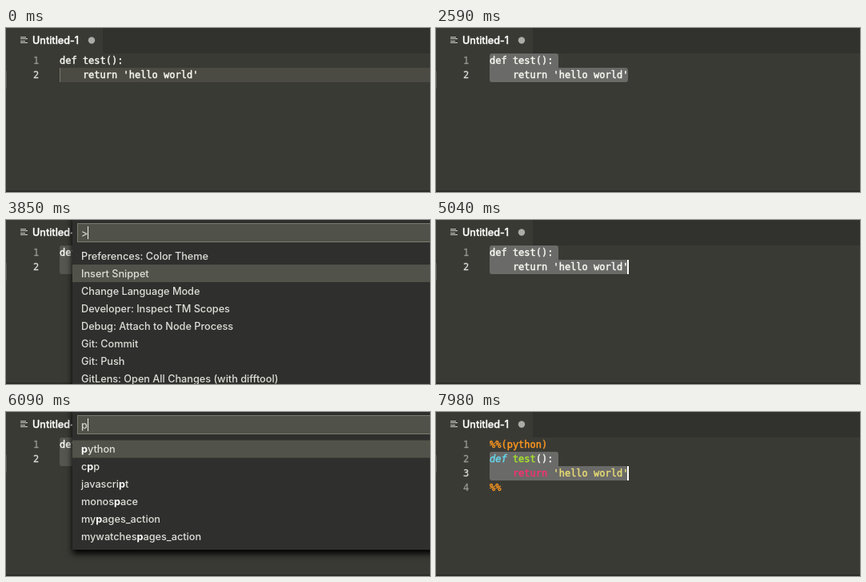
Write an HTML page with a canvas that moves like this. It is 530 px wide and 206 px high and loops after 8000 ms.

```html
<!DOCTYPE html>
<html lang="en">
<head>
<meta charset="utf-8">
<title>Insert snippet</title>
<style>
  html, body { margin: 0; width: 100%; height: 100%; overflow: hidden; background: #3a3a35; }
  canvas { display: block; width: 530px; height: 206px; }
</style>
</head>
<body>
<canvas id="stage"></canvas>
<script>
const W = 530, H = 206, LOOP = 8000;
const canvas = document.getElementById('stage');
const ctx = canvas.getContext('2d');
const dpr = window.devicePixelRatio || 1;
canvas.width = W * dpr;
canvas.height = H * dpr;

const UI = 'Inter, "Open Sans", sans-serif';
const LABEL = '500 12.7px ' + UI;
const MONO = '12px "DejaVu Sans Mono", monospace';
const CODE_X = 67, LINE_H = 18, CODE_TOP = 32, ROW_H = 22;
const C = {
  editor: '#3a3a35', tabs: '#31312e', edge: '#2b2b28',
  text: '#f8f8f2', line: '#4c4b43', sel: '#6a6a68', selDim: '#555650',
  panel: '#2f302d', focus: '#51534a', input: '#505249', border: '#7d7c70', label: '#deded9',
  orange: '#fd971f', cyan: '#66d9ef', green: '#a6e22e', pink: '#f5326f', yellow: '#e6db74'
};

const plainCode = [
  [['def test():', C.text]],
  [["    return 'hello world'", C.text]]
];
const snippetCode = [
  [['%%(python)', C.orange]],
  [['def', C.cyan, 'italic '], [' test', C.green], ['():', C.text]],
  [['    return', C.pink], [" 'hello world'", C.yellow]],
  [['%%', C.orange]]
];
const commands = ['Preferences: Color Theme', 'Insert Snippet', 'Change Language Mode',
  'Developer: Inspect TM Scopes', 'Debug: Attach to Node Process', 'Git: Commit', 'Git: Push',
  'GitLens: Open All Changes (with difftool)'];
const snippets = ['python', 'cpp', 'javascript', 'bold', 'italic', 'underline', 'monospace', 'table'];
const matches = ['python', 'cpp', 'javascript', 'monospace', 'mypages_action', 'mywatchespages_action'];
const typing = [[6020, 'p'], [6160, 'py'], [6370, 'pyt'], [6510, 'pyth'], [6720, 'pytho'], [6930, 'python']];

const within = (t, a, b) => t >= a && t < b;

function rect(x, y, w, h, color) {
  ctx.fillStyle = color;
  ctx.fillRect(x, y, w, h);
}

// Draws text and returns the x where it ends.
function text(str, x, y, font, color, weight = 0) {
  ctx.font = font;
  ctx.fillStyle = color;
  ctx.fillText(str, x, y);
  if (weight) {
    ctx.strokeStyle = color;
    ctx.lineWidth = weight;
    ctx.strokeText(str, x, y);
  }
  return x + ctx.measureText(str).width;
}

function drawFrame() {
  rect(0, 0, W, H, C.editor);
  rect(121, 0, W - 121, CODE_TOP, C.tabs);
  rect(0, 54, 1, 22, '#565651');
  rect(0, H - 2, W, 2, C.edge);
  [[11, 7], [13, 9], [16, 6], [18, 9]].forEach(([y, w]) => rect(18, y, w, 1, '#d0d0cc'));
  text('Untitled-1', 33, 20, '500 12.6px ' + UI, '#ffffff', 0.35);
  ctx.fillStyle = '#ababa7';
  ctx.beginPath();
  ctx.arc(107, 15.5, 4.2, 0, Math.PI * 2);
  ctx.fill();
}

function drawSelection(first, color) {
  const y = CODE_TOP + first * LINE_H;
  ctx.fillStyle = color;
  ctx.beginPath();
  ctx.roundRect(CODE_X, y, 86, LINE_H, [3, 3, 0, 0]);
  ctx.roundRect(CODE_X, y + LINE_H, 173, LINE_H, [0, 3, 3, 3]);
  ctx.fill();
}

function drawCode(lines, active) {
  lines.forEach((parts, i) => {
    const y = CODE_TOP + i * LINE_H + 13;
    text(String(i + 1), 34, y, MONO, i === active ? '#d8d8d4' : '#979791', 0.3);
    let x = CODE_X;
    for (const [str, color, style = ''] of parts) x = text(str, x, y, style + MONO, color, 0.45);
  });
}

function drawRow(label, query, x, y) {
  const start = query ? label.indexOf(query) : 0;
  const end = start + query.length;
  x = text(label.slice(0, start), x, y, LABEL, C.label);
  x = text(query, x, y, 'bold 12.7px ' + UI, '#ffffff');
  text(label.slice(end), x, y, LABEL, C.label);
}

function drawPalette({ value, query = '', items, focus = 0, top, caret }) {
  const bottom = top + items.length * ROW_H + 5.5;
  ctx.save();
  ctx.shadowColor = '#000';
  ctx.shadowBlur = 8 * dpr;
  ctx.shadowOffsetY = 4.5 * dpr;
  rect(83, -10, W, bottom + 10, C.panel);
  ctx.restore();

  rect(89, 4, W, 24, C.border);
  rect(90, 5, W, 22, C.input);
  const end = text(value, 94, 20.5, LABEL, '#d6d6d1');
  if (caret) rect(Math.round(end), 8, 1, 16, '#f0f0ea');

  rect(83, top + focus * ROW_H, W, ROW_H, C.focus);
  items.forEach((label, i) => drawRow(label, query, 94, top + i * ROW_H + 15.5));
}

function paletteAt(t) {
  if (within(t, 2800, 5040)) {
    return {
      value: '>', items: commands, focus: t < 3850 ? 0 : 1, top: 34,
      caret: !within(t, 3290, 3850) && !within(t, 4340, 4900)
    };
  }
  if (within(t, 5110, 7910)) {
    const value = typing.reduce((v, [at, str]) => t >= at ? str : v, '');
    const query = t < 6090 ? '' : value;
    return {
      value, query, top: 35.5,
      items: query ? matches.filter(m => m.includes(query)) : snippets,
      caret: !within(t, 5600, 6020) && t < 7420
    };
  }
  return null;
}

function draw(t) {
  ctx.setTransform(dpr, 0, 0, dpr, 0, 0);
  ctx.textBaseline = 'alphabetic';
  ctx.lineJoin = 'round';
  const palette = paletteAt(t);
  const inserted = t >= 7980;
  const first = inserted ? 1 : 0;

  drawFrame();
  if (t < 2100) {
    rect(CODE_X, 50, W - CODE_X, LINE_H, C.line);
    rect(CODE_X, 50, 1, LINE_H, '#77766c');
  } else {
    drawSelection(first, palette ? C.selDim : C.sel);
  }
  drawCode(inserted ? snippetCode : plainCode, first + 1);

  const cursor = within(t, 1330, 1890) || within(t, 2100, 2590) || t >= 2800;
  if (cursor && !palette) rect(239, CODE_TOP + (first + 1) * LINE_H, 2, LINE_H, '#ffffff');
  if (palette) drawPalette(palette);
}

const began = performance.now();
function tick() {
  draw((performance.now() - began) % LOOP);
  requestAnimationFrame(tick);
}
tick();
</script>
</body>
</html>
```
